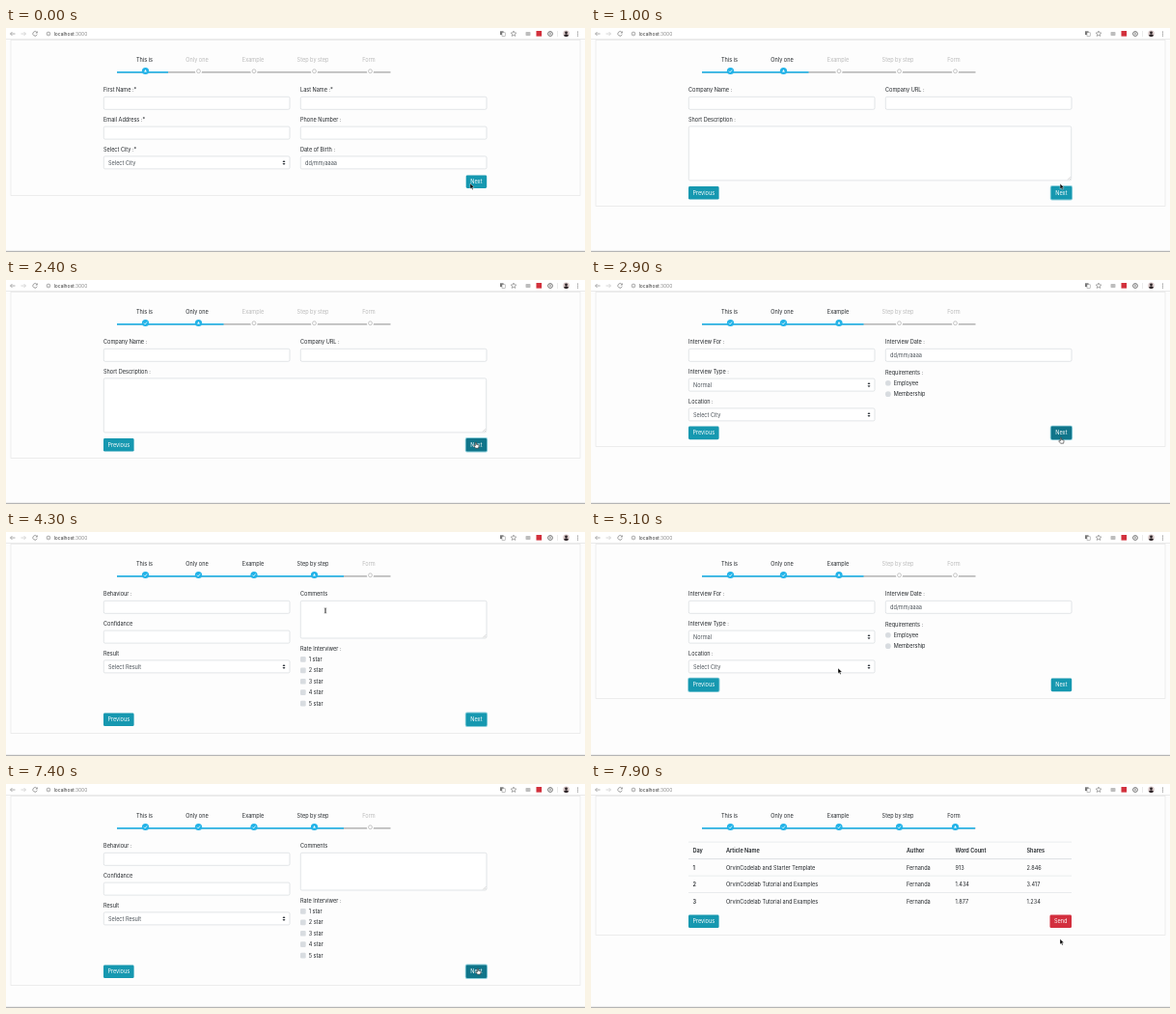
An HTML page for the animation above (8 s loop, 600 by 232 pixels).

```html
<!DOCTYPE html>
<html lang="en">
<head>
<meta charset="utf-8">
<title>Step form</title>
<style>
  html, body { margin: 0; width: 100%; height: 100%; overflow: hidden; background: #fdfdfd; }
  svg { display: block; }
  text { font: 5.55px Inter, "Open Sans", sans-serif; fill: #212529; white-space: pre; }
  .value { fill: #495057; }
  .bold { font-weight: 600; }
  .mid { text-anchor: middle; }
  .off { fill: #b9b9b9; }
  .button { fill: #fff; text-anchor: middle; }
  .field { fill: #fff; stroke: #cfd3d7; stroke-width: .6; }
  .url { font-size: 4.9px; fill: #333; }
</style>
</head>
<body>
<svg id="stage" width="600" height="232" viewBox="0 0 600 232"></svg>
<script>
const LOOP = 8000, TICK = 100;
const BLUE = '#22b3e8', TEAL = '#1698b0', DARK = '#10758a', RED = '#d32f3e';
const LEFT = 101, RIGHT = 305, COL = 193.3, ROW = 30.8;

const rect = (x, y, w, h, attrs = '') => `<rect x="${x}" y="${y}" width="${w}" height="${h}" ${attrs}/>`;
const circle = (x, y, r, attrs = '') => `<circle cx="${x}" cy="${y}" r="${r}" ${attrs}/>`;
const path = (d, attrs = '') => `<path d="${d}" ${attrs}/>`;
const line = (d, color, width = .8) => path(d, `fill="none" stroke="${color}" stroke-width="${width}"`);
// y is the vertical centre of the text
const text = (x, y, s, cls = '') => `<text x="${x}" y="${y + 2}" class="${cls}">${s}</text>`;

const box = (x, y, w, h) => rect(x + .3, y + .3, w - .6, h - .6, 'rx="1.4" class="field"');
const area = (x, y, w, h) => box(x, y, w, h) +
  line(`M${x + w - 4} ${y + h - 1}l3 -3m-1.2 3l1.2 -1.2`, '#999', .4);

function field(x, row, label, value = '', select = false) {
  const y = 71 + row * ROW;
  return text(x, y - 7, label) + box(x, y, COL, 13.6) +
    text(x + 5, y + 7.3, value, 'value') +
    (select ? path(`M${x + 187} ${y + 6.3}l-1.5 0l1.5 -2l1.5 2zm0 3.2l-1.5 -2h3z`, 'fill="#343a40"') : '');
}

function choices(y, labels, round) {
  return labels.map((label, i) => {
    const cy = y + i * 11.45;
    return rect(RIGHT, cy - 2.8, 5.7, 5.7, `rx="${round ? 2.85 : 1.2}" fill="#d8dce0"`) + text(313.7, cy, label);
  }).join('');
}

function table() {
  const xs = [105.5, 140, 327, 377.5, 451.5];
  const rows = [
    ['Day', 'Article Name', 'Author', 'Word Count', 'Shares'],
    ['1', 'OrvinCodelab and Starter Template', 'Fernanda', '913', '2.846'],
    ['2', 'OrvinCodelab Tutorial and Examples', 'Fernanda', '1.434', '3.417'],
    ['3', 'OrvinCodelab Tutorial and Examples', 'Fernanda', '1.877', '1.234']
  ];
  return rows.map((row, r) =>
    rect(LEFT, 59.8 + r * 17.5, 397, r === 1 ? .8 : .5, 'fill="#d5d9dd"') +
    row.map((s, c) => text(xs[c], 69 + r * 17.5, s, r && c ? '' : 'bold')).join('')
  ).join('');
}

const steps = [
  { name: 'This is', x: 143.5, dot: 144.5, end: 168, buttons: 152.4, bottom: 173.5, body:
    field(LEFT, 0, 'First Name :*') + field(RIGHT, 0, 'Last Name :*') +
    field(LEFT, 1, 'Email Address :*') + field(RIGHT, 1, 'Phone Number :') +
    field(LEFT, 2, 'Select City :*', 'Select City', true) + field(RIGHT, 2, 'Date of Birth :', 'dd/mm/aaaa') },
  { name: 'Only one', x: 198, dot: 199.5, end: 225.5, buttons: 164, bottom: 184.5, body:
    field(LEFT, 0, 'Company Name :') + field(RIGHT, 0, 'Company URL :') +
    text(LEFT, 95, 'Short Description :') + area(LEFT, 101.6, 397, 56.6) },
  { name: 'Example', x: 256, dot: 257, end: 282.5, buttons: 151.6, bottom: 172.5, body:
    field(LEFT, 0, 'Interview For :') + field(RIGHT, 0, 'Interview Date :', 'dd/mm/aaaa') +
    field(LEFT, 1, 'Interview Type :', 'Normal', true) + field(LEFT, 2, 'Location :', 'Select City', true) +
    text(RIGHT, 95.5, 'Requirements :') + choices(106.7, ['Employee', 'Membership'], true) },
  { name: 'Step by step', x: 318, dot: 319.5, end: 350, buttons: 187.5, bottom: 208.5, body:
    field(LEFT, 0, 'Behaviour :') + field(LEFT, 1, 'Confidance') +
    field(LEFT, 2, 'Result', 'Select Result', true) +
    text(RIGHT, 64, 'Comments') + area(RIGHT, 71, COL, 39.3) +
    text(RIGHT, 120.5, 'Rate Interviwer :') + choices(131.8, [1, 2, 3, 4, 5].map(n => n + ' star')) },
  { name: 'Form', x: 376, dot: 377.5, end: 398, buttons: 135.5, bottom: 156.5, body: table() }
];

// [time, step, focused button]
const states = [
  [0, 0, ''], [1000, 1, 'Next'], [2500, 2, 'Next'], [3400, 3, 'Next'], [4800, 2, 'Previous'],
  [5700, 2, ''], [6400, 3, 'Next'], [7500, 4, '']
];
// [time, x, y] of the pointer tip
const moves = [
  [0, 481, 161], [200, 481, 161], [700, 486, 161], [900, 486, 161], [1300, 486.5, 162],
  [1700, 486.5, 162], [2100, 487, 168], [2400, 487, 168], [2900, 487, 163], [3800, 487, 163],
  [4100, 420, 122], [4300, 331, 81], [4700, 117, 192], [4800, 117, 192], [5100, 256, 141],
  [5200, 256, 141], [5500, 412, 141], [5600, 412, 141], [5900, 487, 158], [6300, 488, 159],
  [6500, 488, 159], [7200, 489, 191], [7500, 489, 191], [7900, 486, 160.5], [8000, 486, 160.5]
];

function pointerAt(t) {
  const i = moves.findIndex(m => m[0] > t);
  const [a, b] = [moves[i - 1], moves[i]];
  const k = (t - a[0]) / (b[0] - a[0]);
  return [a[1] + (b[1] - a[1]) * k, a[2] + (b[2] - a[2]) * k];
}

const bar =
  rect(0, 0, 600, 11.5, 'fill="#fff"') + rect(0, 11.3, 600, .6, 'fill="#dedede"') +
  line('M9.5 6h-5m2 -2l-2 2l2 2', '#999') + line('M15.5 6h5m-2 -2l2 2l-2 2', '#ccc') +
  line('M32 4.5a2.3 2.3 0 1 0 .3 2.2m.1 -3.2v1.6h-1.6', '#888') +
  circle(44, 6, 1.9, 'fill="none" stroke="#777" stroke-width=".6"') + line('M44 5.7v1.3m0 -2.3v.5', '#777', .5) +
  `<text x="49.7" y="7.8" class="url">localhost<tspan fill="#888">:3000</tspan></text>` +
  rect(512, 3.3, 3.6, 3.8, 'fill="#777"') + rect(514, 4.8, 3.2, 3.8, 'fill="#fff" stroke="#888" stroke-width=".5"') +
  path('M526 3l.8 1.9l2 .2l-1.5 1.3l.5 2l-1.8 -1.1l-1.8 1.1l.5 -2l-1.5 -1.3l2 -.2z', 'fill="none" stroke="#777" stroke-width=".6"') +
  rect(538.5, 4, 5, 4, 'rx=".8" fill="#bdbdbd"') + rect(549.5, 3, 5.6, 5.6, 'fill="#d2303c"') +
  circle(564, 6, 2.4, 'fill="none" stroke="#555" stroke-width=".8"') + rect(563.6, 4.6, .8, 2.5, 'fill="#555"') +
  rect(571.5, 3, .4, 6, 'fill="#ccc"') +
  circle(580.5, 5.8, 3.2, 'fill="#d7c6c6"') + circle(580.5, 4.8, 1.4, 'fill="#2b2427"') +
  path('M577.9 7.7q2.6 -3 5.2 0a3.2 3.2 0 0 1 -5.2 0z', 'fill="#2b2427"') +
  [4, 6, 8].map(y => circle(592.5, y, .55, 'fill="#666"')).join('');

function progress(current) {
  const end = steps[current].end;
  return rect(115, 45, 283.5, 1.6, 'fill="#b8b8b8"') + rect(115, 45, end - 115, 1.6, `fill="${BLUE}"`) +
    steps.map(({ name, x, dot }, i) => {
      const label = text(x, 33, name, i > current ? 'mid off' : 'mid');
      if (i > current) return label + circle(dot, 44.7, 3.6, 'fill="#fdfdfd"') +
        circle(dot, 44.7, 1.9, 'fill="#fff" stroke="#b5b5b5" stroke-width=".8"');
      return label + circle(dot, 44.5, 3.6, `fill="${BLUE}"`) + (i < current
        ? line(`M${dot - 1.6} 44.6l1.2 1.2l2.1 -2.4`, '#fff')
        : path(`M${dot} 43l1.4 2.4h-2.8z`, 'fill="#fff"'));
    }).join('');
}

function button(b, focus, hover) {
  const color = b.label === 'Send' ? RED : hover ? DARK : TEAL;
  const ring = focus === b.label ? rect(b.x - .9, b.y - .9, b.w + 1.8, 15.4, 'rx="2" fill="#8fd0dc"') : '';
  return ring + rect(b.x, b.y, b.w, 13.6, `rx="1.4" fill="${color}"`) +
    text(b.x + b.w / 2, b.y + 6.8, b.label, 'button');
}

const shapes = {
  arrow: path('M0 0v5.6l1.3 -1.2l.9 2l1 -.4l-.9 -2h1.8z', 'fill="#000" stroke="#fff" stroke-width=".4"'),
  hand: path('M-.6 .4q.6 -.8 1.1 0v2l2 .4q.7 .2 .6 1l-.5 2.4h-3l-1.9 -2.4q.1 -.8 1.7 -.1z', 'fill="#fff" stroke="#111" stroke-width=".55"'),
  beam: line('M-1.2 -2.2q1.2 0 1.2 .8v3.6q0 .8 -1.2 .8m2.4 -5.2q-1.2 0 -1.2 .8v3.6q0 .8 1.2 .8', '#222', .6)
};

function frame(t) {
  const [, current, focus] = states.filter(s => s[0] <= t).pop();
  const step = steps[current], y = step.buttons;
  const [px, py] = pointerAt(t);
  const last = current === 4;
  const buttons = [last ? { label: 'Send', x: 475.5, y, w: 22.5 } : { label: 'Next', x: 476.7, y, w: 21.5 }];
  if (current) buttons.push({ label: 'Previous', x: LEFT, y, w: 31.6 });
  const hot = t >= 200 && buttons.find(b => px > b.x && px < b.x + b.w && py > y && py < y + 13.6);
  const typing = current === 3 && px > RIGHT && px < 498 && py > 71 && py < 110;
  const shape = hot ? 'hand' : typing ? 'beam' : 'arrow';

  return rect(0, 0, 600, 232, 'fill="#fdfdfd"') +
    rect(5, 12.5, 590, step.bottom - 12.5, 'fill="none" stroke="#e5e5e5" stroke-width=".7"') +
    bar + progress(current) + step.body +
    buttons.map(b => button(b, focus, b === hot)).join('') +
    rect(0, 230.8, 600, 1.2, 'fill="#b5b5b5"') +
    `<g transform="translate(${px} ${py})">${shapes[shape]}</g>`;
}

const stage = document.getElementById('stage');
let start, shown = -1;
function draw(now) {
  start ??= now;
  const t = Math.floor((now - start) % LOOP / TICK) * TICK;
  if (t !== shown) stage.innerHTML = frame(shown = t);
  requestAnimationFrame(draw);
}
stage.innerHTML = frame(0);
requestAnimationFrame(draw);
</script>
</body>
</html>
```
